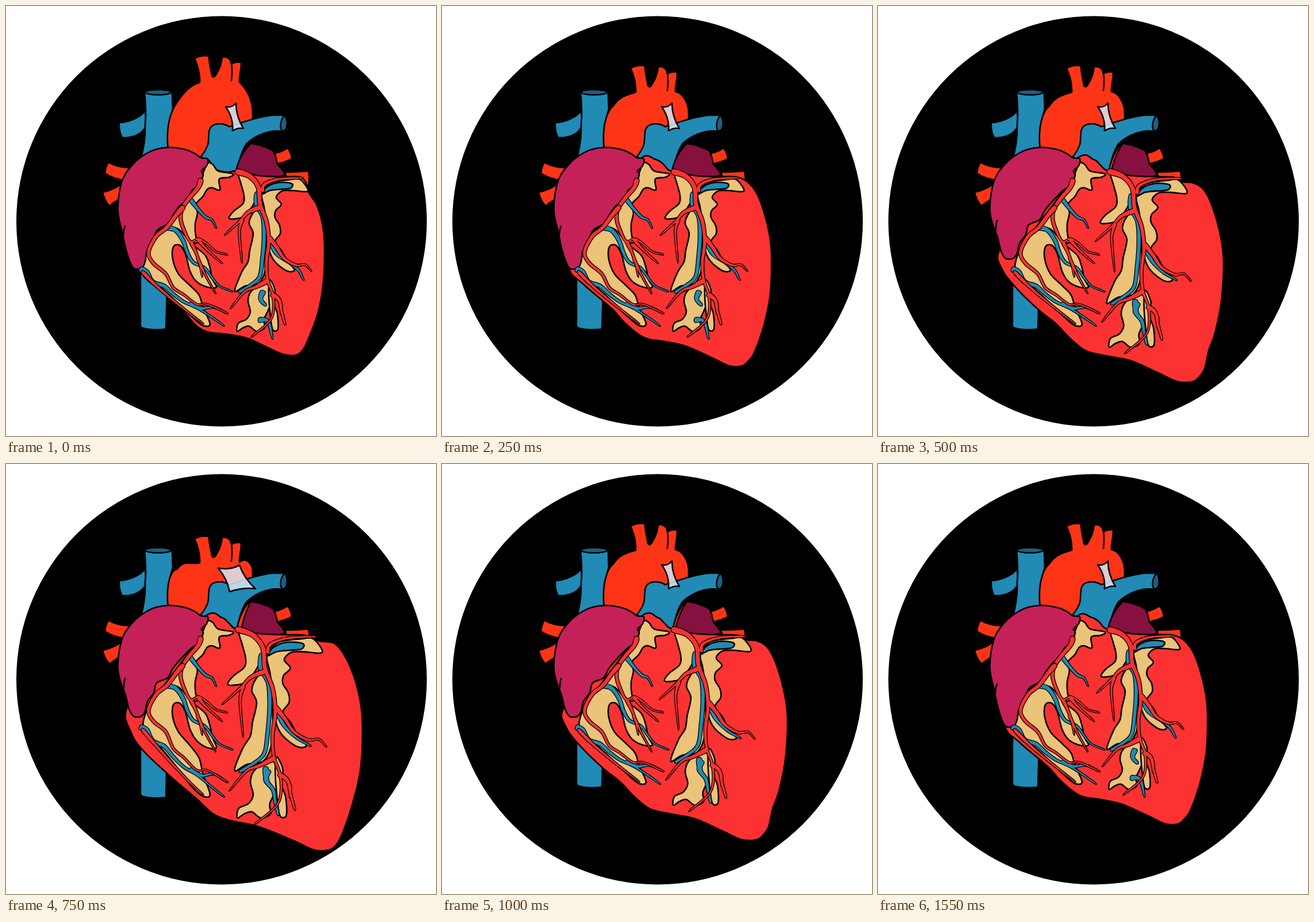
Write an HTML page that moves like this. It is 748x748 px and loops after 1750 ms.

```html
<!DOCTYPE html>
<html lang="en">
<head>
<meta charset="utf-8">
<title>Beating heart</title>
<style>
html, body { margin: 0; width: 100%; height: 100%; overflow: hidden; background: #fff; }
svg { display: block; width: 100vw; height: 100vh; }
</style>
</head>
<body>
<svg id="stage" viewBox="0 0 748 748">
  <circle cx="375" cy="374.5" r="357"/>
  <g id="heart" stroke="#000" stroke-width="2.6" stroke-linejoin="round" stroke-linecap="round"></g>
</svg>
<script>
const BLUE = '#218ab5', DARK_BLUE = '#1a6082', ORANGE = '#fd3516', RED = '#fb3231',
  CREAM = '#ebc379', MAGENTA = '#c42158', PLUM = '#86103f';

const parse = text => text.split(' ').map(pair => pair.split(',').map(Number));

// Closed Catmull-Rom curve as a path
function loop(points) {
  const n = points.length, at = i => points[(i + n) % n];
  let d = 'M' + points[0];
  for (let i = 0; i < n; i++) {
    const [a, b, c, e] = [at(i - 1), at(i), at(i + 1), at(i + 2)];
    const c1 = b.map((v, k) => (v + (c[k] - a[k]) / 6).toFixed(1));
    const c2 = c.map((v, k) => (v - (e[k] - b[k]) / 6).toFixed(1));
    d += `C${c1} ${c2} ${c}`;
  }
  return d + 'Z';
}

// Tapering tube around a centre line
function tube(points, from, to) {
  const left = [], right = [], last = points.length - 1;
  points.forEach(([x, y], i) => {
    const p = points[Math.max(0, i - 1)], q = points[Math.min(last, i + 1)];
    const dx = q[0] - p[0], dy = q[1] - p[1], len = Math.hypot(dx, dy);
    const w = from + (to - from) * i / last;
    left.push([x - dy / len * w, y + dx / len * w]);
    right.unshift([x + dy / len * w, y - dx / len * w]);
  });
  return loop(left.concat(right));
}

const path = (d, fill, extra = '') => `<path d="${d}" fill="${fill}" ${extra}/>`;
const blob = (text, fill, warp = p => p) => path(loop(parse(text).map(warp)), fill);

// Outlines first, then plain fills, so that branches merge
function tubes(list, fill, warp = p => p) {
  const shapes = list.map(([text, from, to]) => tube(parse(text).map(warp), from, to));
  return shapes.map(d => path(d, fill)).join('') +
    shapes.map(d => path(d, fill, 'stroke="none"')).join('');
}

const poses = [
  { drop: 0, scale: [1, 1], sag: 0,
    body: '345,270 364,284 386,289 402,287 440,295 480,297 510,297 521,306 527,325 541,347 551,383 554,420 552,480 543,532 526,579 517,597 505,607 483,606 455,594 420,578 385,571 352,567 330,555 300,521 262,490 236,462 250,420 300,340' },
  { drop: 17, scale: [1, 1], sag: 0,
    body: '345,266 372,267 385,275 398,287 440,295 480,297 510,297 530,305 547,325 559,355 569,395 573,432 571,500 560,555 544,601 534,616 522,626 500,626 470,612 425,592 390,584 352,577 320,553 295,526 247,485 222,457 250,420 300,340' },
  { drop: 17, scale: [1.1, 1.1], sag: 0, big: true,
    body: '345,266 375,267 387,277 400,287 440,295 485,297 515,298 530,306 549,308 567,320 582,350 596,401 601,445 597,515 586,569 575,600 568,631 557,647 545,654 520,653 485,637 440,617 400,609 362,600 335,579 310,553 280,529 240,490 216,458 211,425 260,360' },
  { drop: 39, scale: [1.2, 1.18], sag: 22, big: true,
    body: '345,266 375,267 388,277 400,287 440,295 485,297 520,298 545,308 571,312 590,335 607,375 618,425 620,475 616,535 603,590 587,638 574,663 559,672 535,671 500,655 440,631 390,620 360,608 330,581 290,547 240,500 218,468 210,425 260,360' }
];

function vesselsBehind({ drop, sag, big, scale }) {
  const up = y => y + drop, mid = y => y + drop * .4;
  const wide = sag > 0, foot = wide ? 18 : 0;
  const ligament = wide
    ? 'M369 181Q390 185 406 176Q415 200 434 217Q413 214 389 222Q385 200 369 181Z'
    : 'M382 175Q392 178 400 169Q400 192 413 213Q404 211 394 217Q396 195 382 175Z';
  const shift = big ? (wide ? 9 : 6) : 0;
  return path(`M234 450L234 ${550 + foot}Q233 ${558 + foot} 237 ${560 + foot}Q255 ${565 + foot} 278 ${562 + foot}L281 470Z`, BLUE) +
    path('M178 272C190 279 205 282 220 281L208 303C195 302 183 298 172 291Q173 280 178 272Z', ORANGE) +
    path('M202 308C195 315 180 322 168 324Q171 338 180 348Q189 340 200 335Z', ORANGE) +
    path('M468 256Q480 254 490 247Q497 257 497 266Q485 272 470 275Z', ORANGE) +
    path('M485 289Q505 289 526 287Q529 298 526 312L490 304Z', ORANGE) +
    path('M242 182C235 193 215 202 197 203Q196 218 202 229C225 230 240 220 244 206Z', BLUE) +
    path('M241 150C243 170 244 190 242 207Q243 235 235 264L284 256C280 225 282 205 290 180L289 151Z', BLUE) +
    path('M241 150C245 144 284 144 288 150C283 156 246 156 241 150Z', DARK_BLUE) +
    path(`M282 250C278 212 285 185 298 ${mid(167)}C309 ${mid(150)} 323 ${up(137)} 337 ${up(133)}` +
      `C338 ${up(115)} 333 ${up(102)} 328 ${up(91)}Q340 ${up(85)} 353 ${up(87)}` +
      `C353 ${up(101)} 357 ${up(112)} 358 ${up(121)}Q361 ${up(127)} 366 ${up(118)}` +
      `Q374 ${up(106)} 376 ${up(89)}Q384 ${up(87)} 390 ${up(94)}L392 ${up(101)}` +
      `Q400 ${up(96)} 409 ${up(98)}C410 ${up(112)} 405 ${up(121)} 406 ${up(132)}` +
      `C418 ${mid(144)} 428 ${mid(160)} 429 184L429 205L340 264Z`, ORANGE) +
    path(`M392 ${up(98)}Q394 ${up(114)} 392 ${up(130)}`, 'none') +
    path('M339 262Q351 247 352 236C353 222 352 214 358 209C366 203 380 204 388 210C410 203 440 192 465 190L483 190Q490 194 489 205Q488 216 481 218C455 214 430 228 418 240C410 252 405 270 402 288L370 292L350 272Z', BLUE) +
    path('M484 190C477 200 476 211 480 217Q488 219 489 204Q489 195 484 190Z', DARK_BLUE) +
    path(ligament, '#d9e6f0', 'fill-opacity=".86"') +
    (drop ? path('M402 284Q408 258 422 241L430 250L415 288Z', ORANGE) : '') +
    path(`M426 239Q450 243 465 252Q470 262 472 275Q480 283 486 293C478 299 455 300 437 296Q418 291 ${401 + shift} 283Q${407 + shift} 258 426 239Z`, PLUM);
}

function atrium(big) {
  const tail = big
    ? '323,320 305,338 290,356 281,372 262,381 257,398 246,413 242,430 235,439 222,439 214,426 208,402 203,390'
    : '324,320 318,334 301,349 290,365 284,378 265,388 257,402 254,416 245,427 242,445 236,456 222,456 213,438 206,412 203,396';
  const notch = big ? 'M205 397Q204 385 207 373' : 'M204 398Q204 390 207 383';
  return blob('351,266 339,264 329,257 313,250 286,246 262,249 242,258 222,274 205,297 197,325 195,360 ' +
    tail.split(' ').reverse().join(' ') + ' 336,312 343,294 340,287 349,278', MAGENTA) + path(notch, 'none');
}

function leftVessels(sag, big) {
  const hang = ([x, y]) => [x, y + sag * Math.min(1, Math.max(0, (y - 475) / 70))];
  return blob('350,274 360,276 369,287 395,292 388,298 371,301 372,320 358,316 350,319 342,332 330,345 333,360 329,380 330,400 334,411 318,411 300,397 275,389 305,345 338,300', CREAM) +
    blob('260,400 278,387 300,388 322,413 346,433 354,452 359,475 366,489 350,489 331,479 320,461 312,431 302,416 291,419 290,440 300,466 320,486 336,503 343,525 355,553 343,556 326,543 308,526 292,510 263,483 239,459 246,425', CREAM, hang) +
    atrium(big) +
    tubes([
      ['320,335 332,351 347,367 358,372 365,385', 3, .6],
      ['278,385 295,390 308,408 316,430 326,446 346,456 358,472 371,487 392,496', 3.6, .6]
    ], BLUE) +
    tubes([
      ['234,458 245,463 255,480 275,487 291,501 310,515 332,525 356,540 377,555', 4, .7],
      ['322,518 340,526 362,524 383,534', 3, .6]
    ], BLUE, hang) +
    tubes([
      ['339,302 334,316 318,335 306,353 304,372 311,393 321,410 335,405 350,414 365,427 383,432', 3.6, .7],
      ['334,406 344,418 356,430 374,446', 2.6, .6],
      ['322,411 331,430 337,448 341,469', 2.6, .6],
      ['334,440 347,468 363,497', 2, .6]
    ], RED) +
    tubes([
      ['308,350 295,365 280,385 261,401 248,428 256,447 278,466 291,490 309,502 332,519 350,519 382,533', 3.6, .7],
      ['239,464 262,487 290,511 320,535 341,551', 2.6, .6]
    ], RED, hang);
}

function rightVessels([sx, sy], big) {
  const grow = ([x, y]) => [400 + (x - 400) * sx, 290 + (y - 290) * sy];
  const blobs = [
    '404,290 416,288 429,298 437,312 438,328 430,346 416,365 400,370 388,369 396,357 412,344 414,330 409,310',
    '429,361 423,378 430,396 424,425 421,445 410,463 398,496 416,487 440,482 452,455 453,410 447,375 438,354',
    '426,497 441,486 456,485 459,520 449,545 450,560 436,566 423,557 412,560 402,566 404,552 418,545 425,532 421,513',
    '445,327 460,308 495,302 512,302 525,322 498,321 480,322 470,333 479,345 469,356 468,368 476,382 477,396 468,410 479,425 489,443 502,459 489,461 468,445 458,425 456,395 449,350',
    '459,476 468,495 465,515 472,535 473,562 464,563 460,540 457,500'
  ];
  return blobs.map(b => blob(b, CREAM, grow)).join('') +
    blob('446,327 455,314 475,307 497,309 495,317 476,319 459,321', BLUE, grow) +
    tubes([
      ['437,326 436,346 447,367 449,400 446,440 441,471 425,486 407,497', 3.6, 2],
      [big ? '462,413 470,430 488,448 507,459' : '460,405 470,430 494,447 509,460 517,475', 3.4, .8],
      big ? ['443,493 445,512 454,525 457,542 461,560', 4, 1.5] : ['441,546 456,549 463,576', 4, 1],
      ['447,497 443,510 451,520', 4, 2]
    ], BLUE, grow) +
    tubes([
      ['402,288 424,296 439,315 442,345 453,375 457,410 453,445 455,476 464,502 465,531 457,550 430,573', 4.2, .8],
      ['446,322 450,310 475,301 512,299', 3, 1],
      ['442,350 421,359 407,374 383,396', 3.6, .6],
      ['411,372 406,393 410,441', 2.4, .6],
      ['455,478 434,489 415,497 393,523', 3.6, .6],
      ['463,502 475,511 479,530 485,552', 3.4, 1.2],
      ['471,508 479,519 478,534', 2, .6],
      ['458,403 471,420 484,439 505,451 520,450 530,460', 3.4, .6]
    ], RED, grow);
}

const drawings = poses.map(pose => vesselsBehind(pose) + blob(pose.body, RED) +
  leftVessels(pose.sag, pose.big) + rightVessels(pose.scale, pose.big));

const STEP = 250, beat = [0, 1, 2, 3, 2, 1, 1];
const heart = document.getElementById('heart');
let shown = -1;

function render(now) {
  const pose = beat[Math.floor(now / STEP) % beat.length];
  if (pose !== shown) heart.innerHTML = drawings[shown = pose];
}

const start = performance.now();
function tick() {
  render(performance.now() - start);
  requestAnimationFrame(tick);
}
tick();
</script>
</body>
</html>
```
